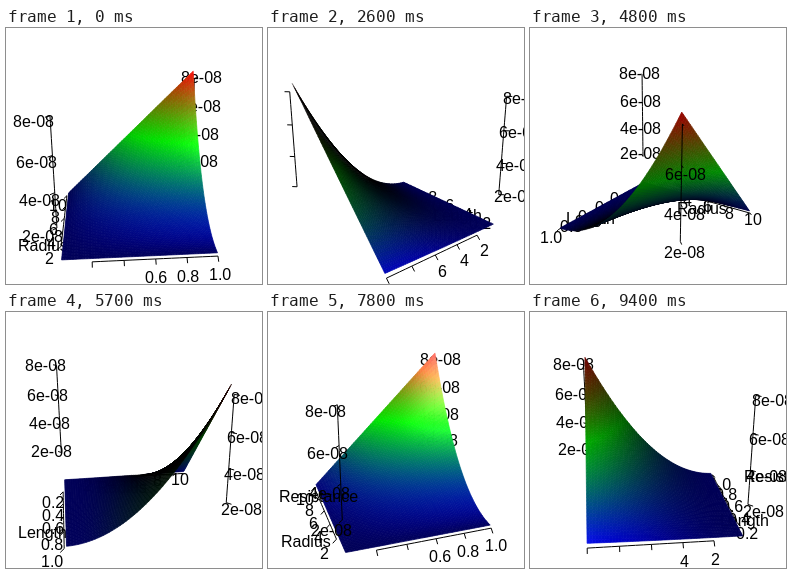
An HTML page with a canvas for the animation above (9.5 s loop, 256x256 px).

```html
<!DOCTYPE html>
<html lang="en">
<head>
<meta charset="utf-8">
<title>Rotating resistance surface</title>
<style>
  html, body { margin: 0; height: 100%; overflow: hidden; background: #fff; }
  canvas { display: block; }
</style>
</head>
<body>
<canvas width="256" height="256"></canvas>
<script>
const ctx = document.querySelector('canvas').getContext('2d');
const SIZE = 256, STEP_MS = 100, STEPS = 95, DEG = Math.PI / 180;
const GRID = 56, EDGE = 0.515, Z_MAX = 8.5;

// Camera: 30 degree lens around the unit cube, raised by 20 degrees
const RADIUS = Math.sqrt(3) / 2;
const DISTANCE = RADIUS / Math.sin(15 * DEG);
const FOCAL = SIZE / 2 / Math.tan(15 * DEG);
const TILT_SIN = Math.sin(20 * DEG), TILT_COS = Math.cos(20 * DEG);
let spinSin, spinCos;

// Length and radius both start at a hundredth of their maximum
const START = 0.01, SPAN = 1 - START;
const fromStart = share => (share - START) / SPAN - 0.5;

const zAxis = {
  dim: 2, values: [2, 4, 6, 8], pos: v => v / Z_MAX - 0.5, label: v => v + 'e-08'
};
const axes = [
  { dim: 0, side: -1, title: 'Length', values: [0.2, 0.4, 0.6, 0.8, 1],
    pos: fromStart, label: v => v.toFixed(1) },
  { dim: 1, side: -1, title: 'Radius', values: [2, 4, 6, 8, 10],
    pos: v => fromStart(v / 10), label: String },
  { ...zAxis, side: -1, title: 'Resistance' },
  { ...zAxis, side: 1 }
];

// Right, up and toward the viewer
function rotate([x, y, z]) {
  const across = x * spinCos - y * spinSin;
  const away = x * spinSin + y * spinCos;
  return [across, z * TILT_COS + away * TILT_SIN, z * TILT_SIN - away * TILT_COS];
}

function project(point) {
  const [right, up, toward] = rotate(point);
  const depth = DISTANCE - toward, scale = FOCAL / depth;
  return { x: SIZE / 2 + right * scale, y: SIZE / 2 - up * scale, depth };
}

const grow = share => START + SPAN * share;
const height = (a, b) => grow(a) * grow(b) ** 2;
const surfacePoint = (a, b) => [a - 0.5, b - 0.5, height(a, b) - 0.5];

function unit(v) {
  const length = Math.hypot(...v);
  return v.map(c => c / length);
}

// Blue-green-red ramp, lit from the front on both sides
function shade(a, b) {
  const h = height(a, b), r = grow(b);
  const normal = unit(rotate([-SPAN * r * r, -2 * SPAN * grow(a) * r, 1]));
  const [right, up, toward] = rotate(surfacePoint(a, b));
  const eye = unit([-right, -up, DISTANCE - toward]);
  const half = unit([eye[0], eye[1], eye[2] + 1]);
  const facing = Math.abs(normal[2]);
  const gloss = Math.abs(normal.reduce((sum, c, i) => sum + c * half[i], 0)) ** 50;
  const ramp = [Math.max(0, 2 * h - 1), 1 - Math.abs(2 * h - 1), Math.max(0, 1 - 2 * h)];
  const rgb = ramp.map(c => Math.min(255, Math.round(255 * (c * facing + gloss))));
  return { color: `rgb(${rgb})`, facing };
}

function addSurface(items) {
  const points = [];
  for (let i = 0; i <= GRID; i++) {
    points.push([]);
    for (let j = 0; j <= GRID; j++) points[i].push(project(surfacePoint(i / GRID, j / GRID)));
  }
  for (let i = 0; i < GRID; i++) {
    for (let j = 0; j < GRID; j++) {
      const quad = [points[i][j], points[i + 1][j], points[i + 1][j + 1], points[i][j + 1]];
      const depth = quad.reduce((sum, p) => sum + p.depth, 0) / 4;
      const { color, facing } = shade((i + 0.5) / GRID, (j + 0.5) / GRID);
      items.push({ depth, draw() {
        ctx.fillStyle = ctx.strokeStyle = color;
        // The outline closes seams; it thins out where the sheet is seen edge-on
        ctx.lineWidth = Math.min(0.7, 0.1 + 4 * facing);
        ctx.beginPath();
        quad.forEach(p => ctx.lineTo(p.x, p.y));
        ctx.closePath();
        ctx.fill();
        ctx.stroke();
      } });
    }
  }
}

function addLine(items, from, to) {
  const p = project(from), q = project(to);
  items.push({ depth: (p.depth + q.depth) / 2, draw() {
    ctx.strokeStyle = '#000';
    ctx.lineWidth = 1;
    ctx.beginPath();
    ctx.moveTo(p.x, p.y);
    ctx.lineTo(q.x, q.y);
    ctx.stroke();
  } });
}

// A label vanishes whole when its anchor or its start leaves the view
function addText(items, text, point) {
  const { x, y, depth } = project(point);
  const left = x - ctx.measureText(text).width / 2, baseline = y + 7;
  const inside = left >= 0 && x <= SIZE && baseline <= SIZE;
  if (!inside || Math.abs(depth - DISTANCE) > RADIUS) return;
  items.push({ depth, draw() {
    ctx.fillStyle = '#000';
    ctx.fillText(text, Math.floor(left), Math.round(baseline));
  } });
}

function addAxis(items, axis) {
  const at = (pos, reach) => {
    const point = Array(3).fill(axis.side * EDGE * reach);
    point[axis.dim] = pos;
    return point;
  };
  const places = axis.values.map(axis.pos);
  const first = places[0], length = places[places.length - 1] - first;
  const pieces = 16;
  for (let i = 0; i < pieces; i++) {
    addLine(items, at(first + length * i / pieces, 1), at(first + length * (i + 1) / pieces, 1));
  }
  places.forEach((pos, i) => {
    addLine(items, at(pos, 1), at(pos, 1.05));
    addText(items, axis.label(axis.values[i]), at(pos, 1.15));
  });
  if (axis.title) addText(items, axis.title, at(0, 1.3));
}

function render(step) {
  const spin = 4.8 * (step + 1) * DEG;
  spinSin = Math.sin(spin);
  spinCos = Math.cos(spin);
  ctx.fillStyle = '#fff';
  ctx.fillRect(0, 0, SIZE, SIZE);
  ctx.font = '16px "Liberation Sans", Arial, sans-serif';
  ctx.lineJoin = 'round';
  const items = [];
  addSurface(items);
  axes.forEach(axis => addAxis(items, axis));
  items.sort((p, q) => q.depth - p.depth).forEach(item => item.draw());
}

let shown = -1;
function tick() {
  const step = Math.floor(performance.now() / STEP_MS) % STEPS;
  if (step !== shown) render(shown = step);
  requestAnimationFrame(tick);
}
tick();
</script>
</body>
</html>
```
